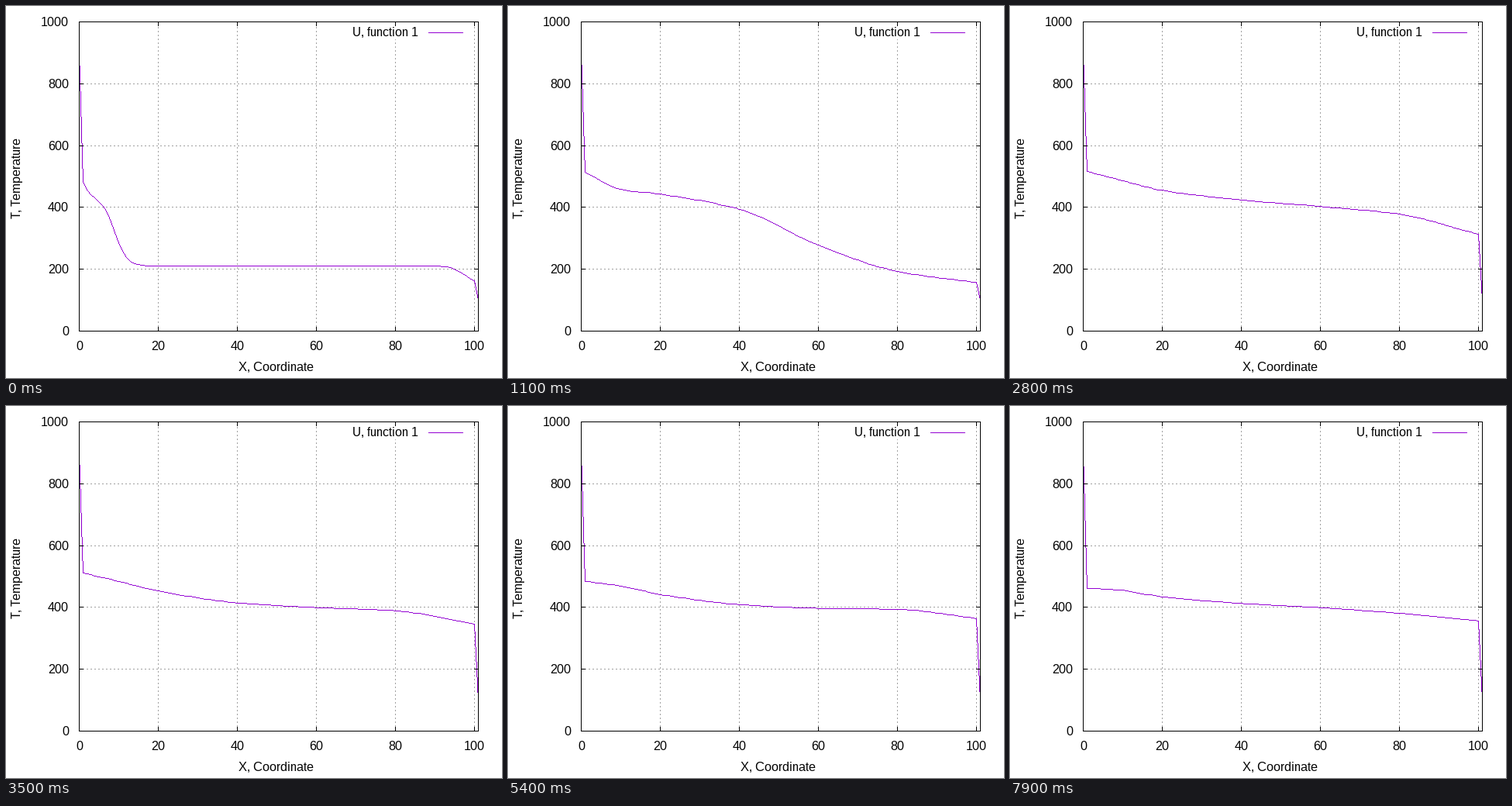
Animation, 640 px wide and 480 px high, one loop 8 s. Source, as a matplotlib script:

```python
import numpy as np
import matplotlib.pyplot as plt
from matplotlib.animation import FuncAnimation
from matplotlib.collections import PolyCollection
from matplotlib.patches import Rectangle

W, H, DPI = 640, 480, 100
PX = 72 / DPI                      # one pixel in points
LEFT, RIGHT, TOP, BOTTOM = 94, 609, 20, 419
FRAMES, INTERVAL = 80, 100
PURPLE, GREY = "#9400d3", "#a0a0a0"
T_HOT, T_COLD, T_BASE = 900, 100, 210
X = np.arange(1, 101)

# After the fronts have met: temperatures at a few places and moments
KEY_X = np.array([1, 10, 20, 40, 60, 80, 100])
KEY_N = np.array([11, 20, 28, 44, 64, 79])
KEY_T = np.array([(514, 458, 443, 394, 278, 193, 157),
                  (516, 478, 450, 439, 395, 310, 223),
                  (516, 486, 455, 424, 403, 378, 313),
                  (499, 479, 449, 408, 395, 395, 365),
                  (471, 460, 436, 411, 399, 391, 363),
                  (462, 455, 434, 413, 399, 381, 357)])


def pchip(q, x, y):
    """Monotone cubic interpolation."""
    h = np.diff(x)
    d = np.diff(y) / h
    a, b = d[:-1], d[1:]
    same = a * b > 0
    m = np.where(same, 2 * a * b / np.where(same, a + b, 1), 0)
    m = np.concatenate([d[:1], m, d[-1:]])
    i = np.clip(np.searchsorted(x, q, side="right") - 1, 0, len(x) - 2)
    t = (q - x[i]) / h[i]
    return ((1 + 2 * t) * (1 - t) ** 2 * y[i] + t * (1 - t) ** 2 * h[i] * m[i]
            + t * t * (3 - 2 * t) * y[i + 1] + t * t * (t - 1) * h[i] * m[i + 1])


def spreading(n):
    """Two fronts that run inwards and widen in proportion to time."""
    t = n + 2.45
    hot = (225 + 0.6 * n) / (1 + np.exp((X - 8.9 - 3.92 * n) / (1.6 + 0.63 * n)))
    layer = (51 + 2 * n) * np.exp(-(X - 1) / (0.54 * t))
    cool = 50 * np.exp(-((101 - X) / (1.9 * t)) ** 2)
    return T_BASE + hot + layer - cool


def settling(n):
    return pchip(X, KEY_X, np.array([pchip(n, KEY_N, col) for col in KEY_T.T]))


def profile(n):
    inner = spreading(n) if n < KEY_N[0] else settling(n)
    return np.concatenate([[T_HOT], inner, [T_COLD]])


def to_px(x, temp):
    px = LEFT + np.asarray(x) * (RIGHT - LEFT) / 101
    py = BOTTOM - np.asarray(temp) * (BOTTOM - TOP) / 1000
    return np.rint(px).astype(int), np.rint(py).astype(int)


def raster(px, py):
    """Pixels of an aliased polyline."""
    pts = []
    for x0, y0, x1, y1 in zip(px, py, px[1:], py[1:]):
        k = max(abs(x1 - x0), abs(y1 - y0)) + 1
        pts.append(np.column_stack([np.linspace(x0, x1, k), np.linspace(y0, y1, k)]))
    return np.unique(np.floor(np.concatenate(pts) + 0.5), axis=0)


UNIT = np.array([(0, 0), (1, 0), (1, 1), (0, 1)])


def squares(n):
    px, py = to_px(np.arange(102), profile(n))
    return raster(px, py)[:, None, :] + UNIT


plt.rcParams.update({"font.family": "Liberation Sans",
                     "text.hinting": "default", "text.hinting_factor": 1})
fig = plt.figure(figsize=(W / DPI, H / DPI), dpi=DPI, facecolor="white")
ax = fig.add_axes([0, 0, 1, 1])
ax.set(xlim=(0, W), ylim=(H, 0))
ax.axis("off")


def bar(x0, y0, x1, y1, color="black"):
    """Filled block covering both end pixels."""
    ax.add_patch(Rectangle((x0, y0), x1 - x0 + 1, y1 - y0 + 1, fc=color,
                           ec="none", lw=0, aa=False, zorder=4))


def dotted(xs, ys):
    ax.plot(xs, ys, color=GREY, lw=PX, ls=(0, (2, 3)), aa=False, snap=False,
            dash_capstyle="butt", zorder=1)


def label(x, y, s, ha="center", **kw):
    ax.text(x, y, s, ha=ha, va="baseline", fontsize=16 * PX, color="black",
            zorder=5, **kw)


for v in range(0, 101, 20):
    x = int(to_px(v, 0)[0])
    if v:
        # the grid leaves the legend area free
        dotted([x + 0.5] * 2, [BOTTOM, 43 if v == 80 else TOP])
    bar(x, BOTTOM - 5, x, BOTTOM)
    bar(x, TOP, x, TOP + 5)
    label(x + 0.5, 444, str(v))

for v in range(0, 1001, 200):
    y = int(to_px(0, v)[1])
    if 0 < v < 1000:
        dotted([LEFT, RIGHT], [y + 0.5] * 2)
    bar(LEFT, y, LEFT + 5, y)
    bar(RIGHT - 5, y, RIGHT, y)
    label(81, y + 6, str(v), ha="right")

for y in (TOP, BOTTOM):
    bar(LEFT, y, RIGHT, y)
for x in (LEFT, RIGHT):
    bar(x, TOP, x, BOTTOM)

label(349, 471, "X, Coordinate")
label(19, 221.5, "T, Temperature", rotation=90, rotation_mode="anchor")
label(532, 39, "U, function 1", ha="right")
bar(545, 34, 589, 34, PURPLE)

curve = PolyCollection(squares(0), facecolors=PURPLE, edgecolors="none",
                       linewidths=0, antialiaseds=False, zorder=3)
ax.add_collection(curve, autolim=False)


def update(n):
    curve.set_verts(squares(n))
    return (curve,)


anim = FuncAnimation(fig, update, frames=FRAMES, interval=INTERVAL,
                     repeat=True, repeat_delay=0, blit=False)
plt.show()
```
